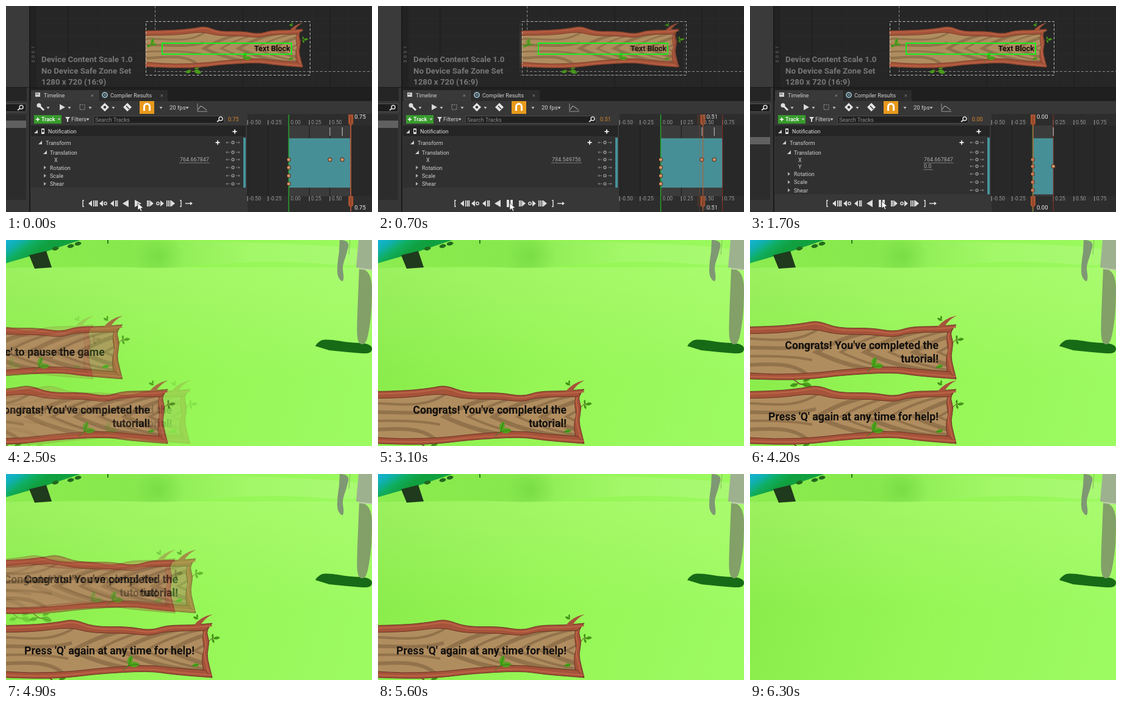
Animation of 600 by 338 pixels, one loop 6.4 s. Source, as an HTML page with a canvas:

```html
<!DOCTYPE html>
<html lang="en">
<head>
<meta charset="utf-8">
<title>Notification banners</title>
<style>
html, body { margin: 0; width: 100%; height: 100%; overflow: hidden; background: #262626; }
canvas { display: block; width: 600px; height: 338px; }
</style>
</head>
<body>
<canvas id="stage" width="600" height="338"></canvas>
<script>
const stage = document.getElementById('stage');
const ctx = stage.getContext('2d');
const LOOP = 6400, STEP = 100, SLIDE = 382, OVERSHOOT = 10, SLOT = 106;
const TICK = 40.56, PHASE = .437;

const clamp = (v, lo = 0, hi = 1) => Math.min(hi, Math.max(lo, v));
const smooth = v => { v = clamp(v); return v * v * (3 - 2 * v); };

// Horizontal offset of a banner, s seconds into its entrance
function slide(s) {
  if (s < .5) return -SLIDE + (SLIDE + OVERSHOOT) * smooth(s / .5);
  return OVERSHOOT * (1 - smooth((s - .5) / .15));
}

// ---- drawing helpers ----
function rect(x, y, w, h, color) {
  ctx.fillStyle = color;
  ctx.fillRect(x, y, w, h);
}

function poly(points, color) {
  ctx.beginPath();
  points.forEach(([x, y]) => ctx.lineTo(x, y));
  ctx.closePath();
  ctx.fillStyle = color;
  ctx.fill();
}

function line(points, color, width = 1, dash = []) {
  ctx.beginPath();
  points.forEach(([x, y]) => ctx.lineTo(x, y));
  ctx.setLineDash(dash);
  ctx.strokeStyle = color;
  ctx.lineWidth = width;
  ctx.stroke();
  ctx.setLineDash([]);
}

function frame(x, y, w, h, color, width = 1, dash = []) {
  line([[x, y], [x + w, y], [x + w, y + h], [x, y + h], [x, y - width / 2]], color, width, dash);
}

function ellipse(x, y, rx, ry, color, angle = 0) {
  ctx.beginPath();
  ctx.ellipse(x, y, rx, ry, angle, 0, 7);
  ctx.fillStyle = color;
  ctx.fill();
}

function ring(x, y, r, color, width = 1) {
  ctx.beginPath();
  ctx.arc(x, y, r, 0, 7);
  ctx.strokeStyle = color;
  ctx.lineWidth = width;
  ctx.stroke();
}

function text(s, x, y, size = 9, color = '#d0d0d0', weight = 400, align = 'left') {
  ctx.font = `${weight} ${size}px Roboto, sans-serif`;
  ctx.textAlign = align;
  ctx.fillStyle = color;
  ctx.fillText(s, x, y);
}

function curve(points) {
  ctx.lineTo(...points[0]);
  for (let i = 1; i < points.length - 1; i++) {
    const [x, y] = points[i], [nx, ny] = points[i + 1];
    ctx.quadraticCurveTo(x, y, (x + nx) / 2, (y + ny) / 2);
  }
  ctx.lineTo(...points.at(-1));
}

function blob(points, color) {
  ctx.beginPath();
  curve(points);
  ctx.closePath();
  ctx.fillStyle = color;
  ctx.fill();
}

function gradient(x0, y0, x1, y1, ...stops) {
  const g = ctx.createLinearGradient(x0, y0, x1, y1);
  stops.forEach((color, i) => g.addColorStop(i / (stops.length - 1), color));
  return g;
}

// ---- wooden banner; the origin is the right end of its text ----
const topOuter = [[-336, -41], [-270, -42], [-222, -47], [-198, -52], [-165, -39], [-110, -40], [-72, -33], [-45, -42], [-5, -42], [29, -45]];
const topInner = [[-336, -30], [-260, -31], [-205, -39], [-170, -29], [-110, -29], [-72, -24], [-45, -33], [18, -33]];
const lowInner = [[-336, 32], [-270, 37], [-200, 34], [-150, 28], [-75, 23], [-40, 28], [18, 32]];
const lowOuter = [[-336, 43], [-260, 46], [-205, 44], [-160, 38], [-75, 33], [-35, 39], [29, 44]];
const sideOuter = [[29, -45], [18, -34], [25, -16], [20, 6], [24, 24], [29, 44]];
const sideInner = [[15, -35], [13, -18], [17, -4], [11, 14], [15, 33]];

function bark(outer, inner) {
  ctx.beginPath();
  curve(outer);
  curve([...inner].reverse());
  ctx.closePath();
  ctx.fillStyle = '#a5533a';
  ctx.fill();
  ctx.strokeStyle = '#6b3322';
  ctx.lineWidth = 1;
  ctx.stroke();
  ctx.beginPath();
  curve(outer.map(([x, y]) => [x - (outer === sideOuter ? 5 : 0), y - Math.sign(y) * 4]));
  ctx.strokeStyle = '#bd6446';
  ctx.lineWidth = 2;
  ctx.stroke();
}

function leaf(x, y, length, angle) {
  ctx.save();
  ctx.translate(x, y);
  ctx.rotate(angle);
  ctx.beginPath();
  ctx.moveTo(0, 0);
  ctx.quadraticCurveTo(length / 2, -length * .55, length, 0);
  ctx.quadraticCurveTo(length / 2, length * .45, 0, 0);
  ctx.fillStyle = '#4fa51d';
  ctx.fill();
  line([[0, 0], [length * .9, 0]], '#2c7312', .8);
  ctx.restore();
}

function grain() {
  ctx.strokeStyle = '#92724b';
  for (let i = 0; i < 6; i++) {
    const x = -200 + i * 40;
    ctx.beginPath();
    ctx.moveTo(x + 150, -42);
    ctx.bezierCurveTo(x + 70, -36, x + 30, -18, x, 0);
    ctx.bezierCurveTo(x + 30, 14, x + 70, 30, x + 150, 36);
    ctx.lineWidth = i % 2 ? 4 : 7;
    ctx.stroke();
  }
  for (let i = 0; i < 4; i++) {
    ctx.beginPath();
    ctx.moveTo(-340, -22 + i * 15);
    ctx.bezierCurveTo(-285, -25 + i * 15, -240, -8 + i * 7, -195 - i * 6, (i - 1.5) * 26);
    ctx.lineWidth = 4 + i % 2 * 2;
    ctx.stroke();
  }
}

function banner(lines) {
  ctx.save();
  ctx.beginPath();
  curve(topOuter);
  curve(sideOuter);
  curve([...lowOuter].reverse());
  ctx.closePath();
  ctx.fillStyle = '#b08d5f';
  ctx.fill();
  ctx.clip();
  grain();
  ctx.restore();

  line([[-240, 43], [-228, 52], [-214, 55]], '#6b3523', 1.5);
  leaf(-230, 52, 14, 2.9);
  leaf(-224, 52, 18, .3);
  leaf(-222, 48, 13, -.4);
  bark(sideOuter, sideInner);
  bark(topOuter, topInner);
  bark(lowOuter, lowInner);

  ctx.beginPath();
  ctx.moveTo(-2, -41);
  ctx.quadraticCurveTo(10, -56, 30, -60);
  ctx.quadraticCurveTo(16, -53, 10, -42);
  ctx.fillStyle = '#a5533a';
  ctx.fill();
  line([[22, -14], [29, -21], [38, -21]], '#6b3523');
  leaf(6, -52, 9, 3.6);
  leaf(5, -54, 6, 4.6);
  leaf(30, -21, 7, 4.7);
  leaf(31, -20, 11, -.15);
  leaf(29, -20, 8, 1.2);
  line([[-117, 32], [-107, 23]], '#4b7a22', 1.2);
  leaf(-108, 24, 17, -1.25);
  leaf(-108, 24, 18, -.1);
  leaf(-4, 25, 12, -.2);
  leaf(-322, -8, 16, -1.3);
  leaf(-322, -8, 12, -.1);
  leaf(-322, -8, 12, 2.8);

  lines.forEach((s, i) =>
    text(s, 0, 6 + (i - (lines.length - 1) / 2) * 22, 17.7, '#12100e', 700, 'right'));
}

// ---- editor ----
const caret = (x, y = 167) => poly([[x - 2.5, y - 1.5], [x + 2.5, y - 1.5], [x, y + 2]], '#c8c8c8');
const tri = (x, y, w, h, color = '#d8d8d8') => poly([[x, y - h], [x + w, y], [x, y + h]], color);

function diamond(x, y, r) {
  poly([[x, y - r], [x + r, y], [x, y + r], [x - r, y]], '#e4e4e4');
}

function plus(x, y, r = 3.5) {
  line([[x - r, y], [x + r, y]], '#eee', 1.8);
  line([[x, y - r], [x, y + r]], '#eee', 1.8);
}

function magnifier(x, y) {
  ring(x + 1, y - 1, 3, '#ddd', 1.5);
  line([[x - 1, y + 1], [x - 5, y + 4]], '#ddd', 2);
}

function viewport(dx, dy) {
  ctx.save();
  ctx.beginPath();
  ctx.rect(40, 0, 560, 133);
  ctx.clip();
  rect(40, 0, 560, 133, '#262626');
  for (let x = 102; x < 600; x += 28.6) line([[x, 0], [x, 133]], '#2a2a2a');
  for (let y = 21; y < 133; y += 28.6) line([[40, y], [600, y]], '#2a2a2a');
  for (const x of [102, 388, 531]) line([[x, 0], [x, 133]], '#181818');
  rect(40, 0, 10, 133, '#222');
  [...'1000'].forEach((digit, i) => {
    ctx.save();
    ctx.translate(47, 70 + i * 7.5);
    ctx.rotate(-Math.PI / 2);
    text(digit, 0, 0, 7, '#777');
    ctx.restore();
  });
  line([[244.5, 0], [244.5, 107.5], [600, 107.5]], '#8a8a8a', 1, [4, 3]);
  ['Device Content Scale 1.0', 'No Device Safe Zone Set', '1280 x 720 (16:9)'].forEach((s, i) =>
    text(s, 58, 92 + i * 18.7, 13.3, '#777', 700));

  ctx.translate(dx, dy);
  ctx.save();
  ctx.translate(466, 69.5);
  ctx.scale(.706, .706);
  banner(['Text Block']);
  ctx.restore();
  frame(229.5, 25.5, 269, 88, '#c4c4c4', 1, [4, 3]);
  frame(256, 61, 212, 18, '#12f01c', 2);
  ctx.restore();
}

function sidebar(second) {
  rect(0, 0, 38, 133, '#3a3a3a');
  rect(0, 134, 38, 204, '#363636');
  rect(0, 134, 34, 22, '#252525');
  rect(0, 160, 33, 14, '#1d1d1d');
  frame(-2, 160.5, 35, 13, '#555');
  magnifier(24, 167);
  rect(0, 178, 33, 140, '#2c2c2c');
  rect(0, second ? 215 : 188, 33, 12, '#606060');
}

function toolbar(time) {
  rect(40, 134, 560, 22, '#1f1f1f');
  rect(41, 138, 112, 18, '#393939');
  rect(154, 138, 111, 18, '#2b2b2b');
  rect(48, 142, 8, 7, '#ccc');
  rect(49, 144, 4, 1, '#333');
  text('Timeline', 62, 149.5);
  text('×', 139, 149.5, 9, '#888');
  ring(162, 146, 4, '#8fb4c4', 2);
  ring(162, 146, 1.2, '#8fb4c4');
  text('Compiler Results', 171, 149.5);
  text('×', 253, 149.5, 9, '#777');

  rect(40, 156, 560, 182, '#373737');
  line([[53, 162], [62, 171]], '#e4e4e4', 3);
  ring(54, 163, 2.5, '#e4e4e4', 2);
  tri(88, 166, 9, 5);
  frame(121, 162, 8, 8, '#aaa', 1, [2, 1.5]);
  diamond(162, 166, 7);
  rect(160, 164, 4, 4, '#444');
  diamond(199, 166, 7);
  line([[197, 164], [202, 169]], '#333', 1.5);
  [69, 104, 138, 176, 254, 297].forEach(x => caret(x));
  rect(219, 156, 24, 21, '#e89a1c');
  ctx.beginPath();
  ctx.arc(231, 165, 4.5, Math.PI, 0);
  ctx.moveTo(226.5, 165);
  ctx.lineTo(226.5, 172);
  ctx.moveTo(235.5, 165);
  ctx.lineTo(235.5, 172);
  ctx.strokeStyle = '#fff';
  ctx.lineWidth = 3;
  ctx.stroke();
  text('20 fps', 268, 170, 9.5);
  line([[314, 160], [314, 173], [330, 173]], '#999');
  line([[315, 170], [319, 164], [323, 166], [329, 171]], '#bbb');

  rect(46, 179, 45, 14, '#379a2c');
  plus(52, 186, 3);
  text('Track', 58, 189, 9, '#fff', 500);
  caret(87, 186);
  poly([[97, 182], [105, 182], [102, 186], [102, 190], [100, 190], [100, 186]], '#ddd');
  text('Filters', 107, 189);
  caret(134, 186);
  rect(143, 180, 215, 13, '#202020');
  frame(143.5, 180.5, 214, 12, '#4c4c4c');
  text('Search Tracks', 146, 189.5, 9, '#8c8c8c');
  magnifier(351, 186);
  text(time.toFixed(2), 364, 189, 9, '#d8862a');
}

function tracks(second, values) {
  const end = second ? 309 : 298;
  const step = 13.4;
  rect(41, 196, 352, 18, '#252525');
  rect(41, 215, 352, end - 215, '#303030');
  rect(389, 216, 4, end - 216, '#47939a');
  const open = (x, y) => poly([[x + 3, y - 3], [x + 3, y + 3], [x - 3, y + 3]], '#ccc');
  open(49, 206);
  rect(58, 201, 5, 9, '#ddd');
  rect(59, 203, 3, 4, '#333');
  text('Notification', 69, 209, 9, '#e0e0e0');
  plus(375, 206);
  plus(347, 224);
  open(56, 224);
  open(64, 240);
  text('Transform', 65, 228);
  text('Translation', 72, 243.5);
  const rows = [224, 240, 252];
  text('X', 79, 255.5);
  if (second) {
    text('Y', 79, 266.5);
    rows.push(263);
  }
  values.forEach((v, i) => {
    const y = 255 + i * 11;
    text(v, 285, y, 9, '#aaa');
    line([[284, y + 2.5], [i ? 300 : 334, y + 2.5]], '#777');
  });
  ['Rotation', 'Scale', 'Shear'].forEach((name, i) => {
    const y = (second ? 275.5 : 265) + i * step;
    poly([[62, y - 3], [66, y], [62, y + 3]], '#aaa');
    text(name, 72, y + 3.5);
    rows.push(y);
  });
  rows.forEach(y => {
    ring(372, y, 2, '#999', 1.3);
    line([[361, y], [367, y]], '#777');
    line([[377, y], [383, y]], '#777');
    poly([[360, y], [363, y - 2], [363, y + 2]], '#777');
    tri(381, y, 3, 2, '#777');
  });
  return rows;
}

function controls(playing) {
  const y = 324, white = '#ddd';
  const back = (x, w = 6) => tri(x, y, -w, 5, white);
  const ahead = (x, w = 6) => tri(x, y, w, 5, white);
  const bar = x => rect(x, y - 5, 1.8, 10, white);
  line([[128, 319], [126, 319], [126, 329], [128, 329]], white, 1.5);
  back(141); bar(143); bar(146); bar(148.5);
  back(159); ring(163, y, 2.2, white, 1.5);
  back(177); bar(179); bar(181.5);
  tri(201, y, -10, 6, white);
  if (playing) { rect(211, 318, 4, 12, white); rect(217, 318, 4, 12, white); }
  else tri(211, y, 11, 6, white);
  bar(231); bar(233.5); ahead(236);
  ring(249, y, 2.2, white, 1.5); ahead(253);
  bar(263); bar(266); bar(269); ahead(271);
  line([[285, 319], [287, 319], [287, 329], [285, 329]], white, 1.5);
  line([[294, y], [303, y]], white, 1.5);
  tri(302, y, 4, 3, white);
}

function timeline(second, time, rows) {
  const at = s => 463.5 + s * 135;
  const length = second ? .25 : .75, end = at(length), bottom = second ? 309 : 298;
  rect(396, 177, 204, 161, '#282828');
  rect(at(0), 196, end - at(0), 116, '#3b3b3b');
  rect(396, 177, 204, 19, '#2d2d2d');
  rect(396, 312, 204, 26, '#2d2d2d');
  for (let s = -.5; s < 1; s += .25) {
    line([[at(s), 196], [at(s), 312]], '#1c1c1c');
    line([[at(s), 187], [at(s), 195]], '#aaa');
    line([[at(s), 312], [at(s), 320]], '#aaa');
    if (s === time) continue;
    for (const y of [194, 319]) text(s.toFixed(2), at(s) + 3, y, 8.5, '#999');
  }
  rect(at(0), 217, end - at(0), bottom - 217, '#478f96');
  line([[end, 178], [end, 338]], '#8e3029');
  line([[at(0), 178], [at(0), 338]], '#27a52d', 1.5);
  (second ? [.25] : [.5, .65]).forEach(s => line([[at(s), 199], [at(s), 213]], '#ccc'));

  const key = (s, y) => {
    ellipse(at(s), y, 3.5, 3.5, '#4d2d20');
    ellipse(at(s), y, 2.5, 2.5, '#d59569');
  };
  rows.slice(2).forEach(y => key(0, y));
  if (second) key(.25, 263);
  else [.5, .65].forEach(s => key(s, 252));

  const x = at(time) + .5;
  line([[x, 178], [x, 337]], '#b3613f', 1.5);
  for (const y of [178, 312]) {
    poly([[x - 4, y], [x + 4, y], [x + 4, y + 15], [x, y + 19], [x - 4, y + 15]], '#a9532f');
    line([[x, y + 2], [x, y + 16]], '#78391f');
  }
  for (const y of [185, 334]) text(time.toFixed(2), x + 6, y, 9.5, '#f0f0f0');
}

function cursor(x, y) {
  const shape = [[0, 0], [0, 12], [3, 9.5], [5, 14], [7, 13], [5, 9], [9, 8.5], [0, 0]]
    .map(([a, b]) => [x + a, y + b]);
  poly(shape, '#fff');
  line(shape, '#222', .7);
}

function editor(t) {
  const second = t >= 1200;
  let time, dx = 0, dy = 0;
  if (second) {
    time = clamp((t - 1750) / 1000, 0, .25);
    dy = -SLOT * .706 * smooth(time / .25);
  } else {
    time = t < 200 ? .75 : clamp((t - 200) / 1000, 0, .75);
    dx = slide(time) * .706;
  }
  const values = [(764.667847 * (1 + dx / (SLIDE * .706))).toFixed(6)];
  if (second) values.push((dy * 2.83 || 0).toFixed(1));
  rect(0, 0, 600, 338, '#1a1a1a');
  viewport(dx, dy);
  sidebar(second);
  toolbar(time);
  const rows = tracks(second, values);
  controls(second ? t >= 1650 && t < 2000 : t >= 200 && t < 950);
  timeline(second, time, rows);
  cursor(216, second ? 320 : 323);
}

// ---- game ----
const messages = [
  { lines: ["Press 'Esc' to pause the game"], enter: -2000, push: 1160, leave: 2125 },
  { lines: ["Congrats! You've completed the", 'tutorial!'], enter: 2140, push: 3138, leave: 4640 },
  { lines: ["Press 'Q' again at any time for help!"], enter: 3138, push: 1e5, leave: 5625 },
];

function place(m, t) {
  const s = t < m.leave ? (t - m.enter) / 1000 : .65 - (t - m.leave) / 1000;
  return [309 + slide(s), 290 - SLOT * smooth((t - m.push) / 250)];
}

function field() {
  rect(0, 0, 600, 338, gradient(0, 60, 600, 240, '#88eb4a', '#95f655', '#9dfb62'));
  rect(0, 45, 600, 180, gradient(0, 45, 0, 225, 'rgba(205, 255, 150, .28)', 'rgba(205, 255, 150, 0)'));

  blob([[0, 0], [600, 0], [600, 46], [460, 34], [330, 40], [245, 47], [150, 42], [0, 46]],
    gradient(0, 0, 600, 0, '#8cec50', '#86e84c', '#a2f868', '#aafa74'));
  const dip = ctx.createRadialGradient(250, 26, 2, 250, 26, 42);
  dip.addColorStop(0, 'rgba(95, 200, 50, .4)');
  dip.addColorStop(1, 'rgba(95, 200, 50, 0)');
  rect(205, 0, 90, 46, dip);

  poly([[0, 0], [122, 0], [66, 19], [0, 38]],
    gradient(0, 0, 25, 36, '#14b4d8', '#10b0b0', '#0fae60', '#11a040'));
  poly([[38, 25], [66, 18], [75, 45], [47, 47]], '#1f3a1c');
  [[81, 14], [106, 10], [118, 6]].forEach(([x, y]) => ellipse(x, y, 5.5, 3, '#226a1d', -.2));
  rect(166, 0, 2, 6, '#2c7a1c');

  blob([[507, 174], [513, 164], [532, 163], [560, 168], [600, 170], [600, 187], [570, 185], [530, 181]], '#176b16');
  blob([[547, 0], [564, 0], [558, 24], [551, 44], [554, 60], [552, 70], [543, 60], [543, 40], [546, 20]], '#7f9874');
  line([[564, 0], [562, 24]], '#86b563');
  poly([[578, 0], [600, 0], [600, 49], [574, 45]], '#9db18e');
  blob([[579, 46], [600, 48], [600, 112], [595, 150], [590, 170], [580, 172], [575, 160], [576, 120]], '#82a068');
  line([[579, 47], [600, 49]], '#c3cfae', 2);
}

function game(t) {
  field();
  for (const m of messages) {
    const [x, y] = place(m, t);
    ctx.save();
    ctx.translate(x, y);
    if (x > -40) banner(m.lines);
    ctx.restore();
  }
}

const scene = t => t < 2200 ? editor(t) : game(t);
const buffer = document.createElement('canvas');
buffer.width = 600;
buffer.height = 338;

function paint(t) {
  const tick = Math.floor(t / TICK - PHASE);
  const moment = (tick + PHASE) * TICK;
  scene(moment + TICK);
  buffer.getContext('2d').drawImage(stage, 0, 0);
  scene(moment);
  ctx.globalAlpha = (t - moment) / TICK;
  ctx.drawImage(buffer, 0, 0);
  ctx.globalAlpha = 1;
}

const start = performance.now();
let shown = -1;
function draw() {
  const t = Math.floor((performance.now() - start) % LOOP / STEP) * STEP;
  if (t !== shown) paint(shown = t);
  requestAnimationFrame(draw);
}
draw();
</script>
</body>
</html>
```
